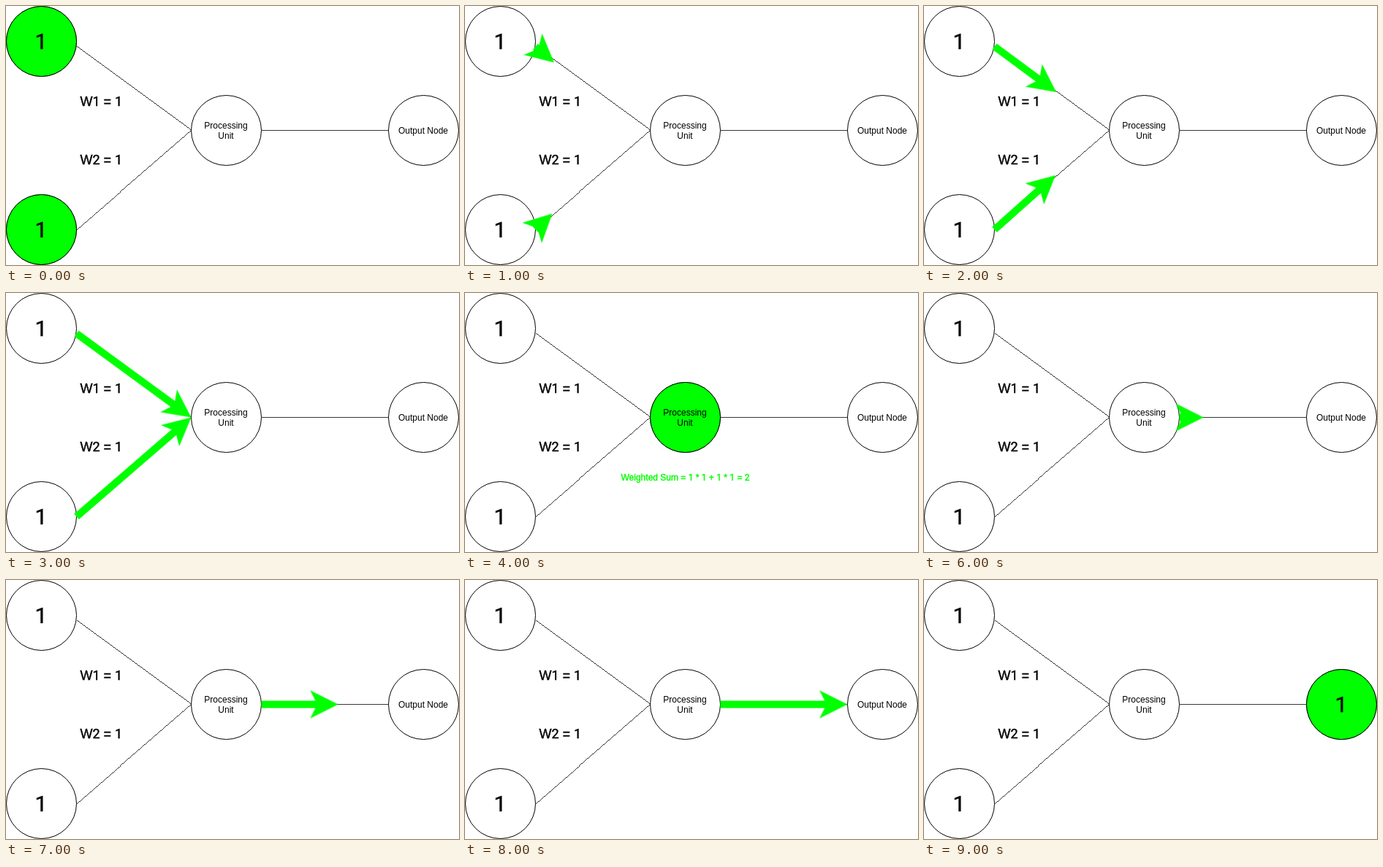
These frames come from a looping animation (620 by 355 pixels, 10000 ms). An HTML page:

```html
<!DOCTYPE html>
<html lang="en">
<head>
<meta charset="utf-8">
<title>Perceptron forward pass</title>
<style>
  html, body { margin: 0; width: 100%; height: 100%; overflow: hidden; background: #fff; }
  svg { display: block; width: 620px; height: 355px; }
  text { font: 12px "Liberation Sans", Arial, sans-serif; text-anchor: middle; }
  .digit { font-family: Roboto, sans-serif; }
  .heavy { stroke: currentColor; stroke-width: .4; }
  .label { font-size: 18px; }
  .value { font-size: 30px; }
  .note { fill: #0f0; color: #0f0; }
  .wire, .node { stroke: #000; fill: none; }
  .wire { stroke-width: .78; shape-rendering: crispEdges; }
  .lit { fill: #0f0; }
  .shaft { stroke: #0f0; stroke-width: 10; }
  .head { fill: #0f0; }
</style>
</head>
<body>
<svg id="stage" viewBox="0 0 620 355"></svg>
<script>
const STEP = 1000, STEPS = 10;
const stage = document.getElementById("stage");

const top1 = [48.5, 48.5], bottom1 = [48.5, 306.5];
const unit = [301.5, 170.5], output = [571.5, 170.5];
const startA = [96.5, 55.5], startB = [96.5, 306.5];
const unitIn = [253.5, 170.5], unitOut = [349.5, 170.5], outputIn = [523.5, 170.5];

function add(tag, attrs, parent = stage) {
  const el = document.createElementNS("http://www.w3.org/2000/svg", tag);
  for (const key in attrs) el.setAttribute(key, attrs[key]);
  return parent.appendChild(el);
}

function line([x1, y1], [x2, y2], cls, parent) {
  return add("line", { x1, y1, x2, y2, class: cls }, parent);
}

function circle([cx, cy], cls) {
  return add("circle", { cx, cy, r: 48, class: cls });
}

// Digits get their own face, so that the 1 has no foot.
function text(content, x, y, cls = "") {
  const el = add("text", { x, y, class: cls });
  for (const part of content.split(/(\d)/).filter(Boolean)) {
    add("tspan", { class: /\d/.test(part) ? "digit" : "" }, el).textContent = part;
  }
  return el;
}

// Shaft plus a notched head whose tip lies on the end point.
function arrow(from, to) {
  const dx = to[0] - from[0], dy = to[1] - from[1];
  const length = Math.hypot(dx, dy);
  const group = add("g", {
    transform: `translate(${from}) rotate(${Math.atan2(dy, dx) * 180 / Math.PI})`
  });
  line([0, 0], [length - 24, 0], "shaft", group);
  add("path", {
    class: "head",
    d: `M${length} 0l-38.36 -19.18l9.59 19.18l-9.59 19.18z`
  }, group);
  return group;
}

// Shows an element only during steps first up to, not including, end.
function during(first, end, el) {
  const frames = Array.from({ length: STEPS + 1 }, (_, i) => ({
    opacity: i >= first && i < end ? 1 : 0,
    offset: i / STEPS,
    easing: "steps(1, end)"
  }));
  el.animate(frames, { duration: STEP * STEPS, iterations: Infinity });
}

line(startA, unitIn, "wire");
line(startB, unitIn, "wire");
line(unitOut, outputIn, "wire");

for (const center of [top1, bottom1, unit, output]) circle(center, "node");
during(0, 1, circle(top1, "node lit"));
during(0, 1, circle(bottom1, "node lit"));
during(4, 6, circle(unit, "node lit"));
during(9, 10, circle(output, "node lit"));

const arrows = [
  [1, startA, [122, 77.5]],
  [1, startB, [119.5, 284.5]],
  [2, startA, [181, 118]],
  [2, startB, [180, 232]],
  [3, startA, unitIn],
  [3, startB, unitIn],
  [6, unitOut, [382.7, 170.5]],
  [7, unitOut, [454.7, 170.5]],
  [8, unitOut, outputIn]
];
for (const [step, from, to] of arrows) during(step, step + 1, arrow(from, to));

text("1", 48, 59, "value heavy");
text("1", 48, 317, "value heavy");
text("W1 = 1", 130.3, 137, "label heavy");
text("W2 = 1", 130.3, 217, "label heavy");
text("Processing", 301, 168);
text("Unit", 301, 182);
during(0, 9, text("Output Node", 571, 175));
during(9, 10, text("1", 571, 181, "value heavy"));
during(4, 5, text("Weighted Sum = 1 * 1 + 1 * 1 = 2", 301.5, 257, "note heavy"));
during(5, 6, text("2 > 1, Activate", 301.5, 257, "note heavy"));
</script>
</body>
</html>
```
